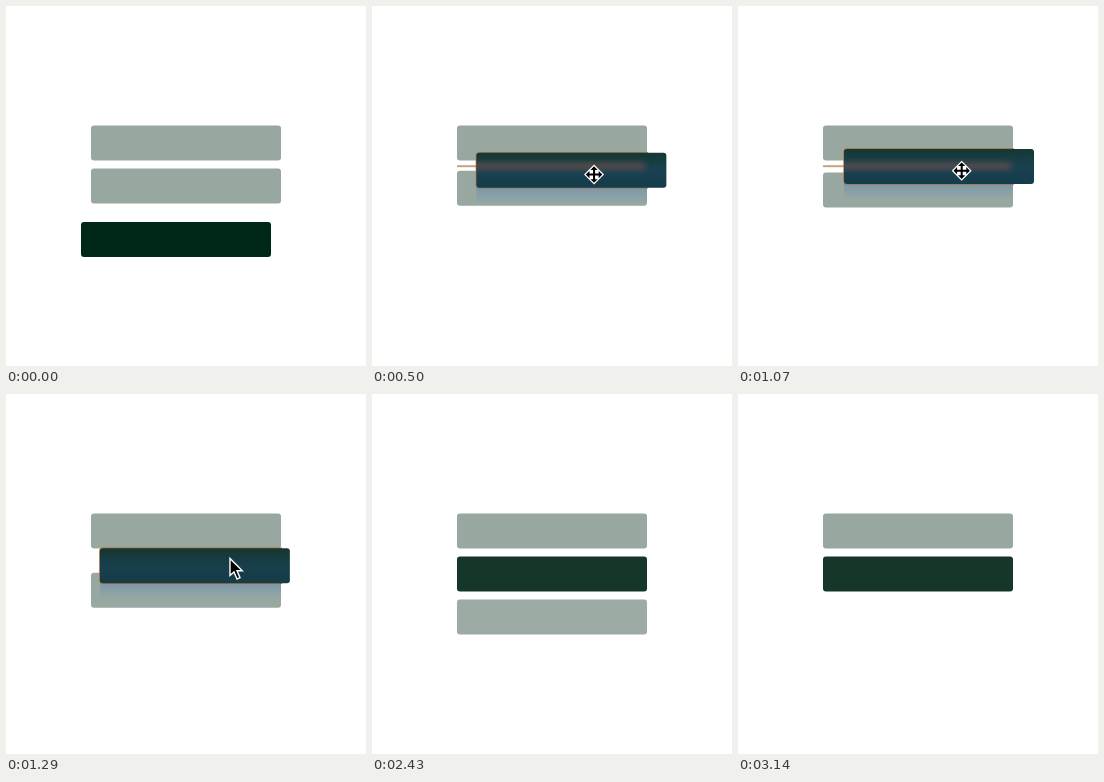
Recreate the animation shown at these times as an HTML page with a canvas. Size 360 by 360 pixels, loop 3430 ms.

```html
<!DOCTYPE html>
<html lang="en">
<head>
<meta charset="utf-8">
<title>Drag to reorder</title>
<style>
  html, body { margin: 0; height: 100%; overflow: hidden; background: #fff; }
  canvas { display: block; width: 100vw; height: 100vh; }
</style>
</head>
<body>
<canvas width="360" height="360"></canvas>
<script>
const ctx = document.querySelector('canvas').getContext('2d');
const LOOP = 3430, STEP = 1000 / 14;
const W = 190, H = 35, LEFT = 85;
const SLOTS = [119.5, 162.5, 205.5];
const LIGHT = '#98a8a1', ORANGE = '#b4703a';

// Times below are in steps of 1/14 s.
const DRAG = 2, HOVER = 6, DROP = 16, SETTLED = 24, FADE = 33.5, GONE = 44;

const progress = (t, from, to) => Math.min(1, Math.max(0, (t - from) / (to - from)));
const easeOut = (p, power = 3) => 1 - (1 - p) ** power;
const mix = (a, b, p) => a + (b - a) * p;
const mixColor = (a, b, p) => `rgb(${a.map((v, i) => Math.round(mix(v, b[i], p)))})`;

function barPath(x, y) {
  ctx.beginPath();
  ctx.roundRect(x, y, W, H, 3);
}

function bar(x, y, fill) {
  barPath(x, y);
  ctx.fillStyle = fill;
  ctx.fill();
}

function polygon(points, fill) {
  ctx.beginPath();
  points.forEach(([x, y]) => ctx.lineTo(x, y));
  ctx.closePath();
  ctx.fillStyle = fill;
  ctx.fill();
}

function moveCursor(x, y) {
  ctx.save();
  ctx.translate(x, y);
  polygon([[0, -10], [10, 0], [0, 10], [-10, 0]], '#fff');
  for (let i = 0; i < 4; i++) {
    polygon([[0, -8.2], [3.6, -4.6], [1, -4.6], [1, 0], [-1, 0], [-1, -4.6], [-3.6, -4.6]], '#000');
    ctx.rotate(Math.PI / 2);
  }
  ctx.restore();
}

function arrowCursor(x, y) {
  ctx.save();
  ctx.translate(x, y);
  polygon([[0, 0], [0, 17], [4, 13.4], [7, 20.5], [10, 19.2], [7, 12.3], [12.3, 12.3]], '#000');
  ctx.strokeStyle = '#fff';
  ctx.lineWidth = 1.4;
  ctx.stroke();
  ctx.restore();
}

// Blue shade cast on the bar below the dragged one.
function shade(x, y, lowerY, alpha) {
  ctx.save();
  barPath(LEFT, lowerY);
  ctx.clip();
  const bottom = y + H;
  const blue = ctx.createLinearGradient(0, bottom, 0, bottom + 16);
  blue.addColorStop(0, `rgba(112, 148, 174, ${0.75 * alpha})`);
  blue.addColorStop(1, 'rgba(112, 148, 174, 0)');
  ctx.fillStyle = blue;
  ctx.fillRect(x, bottom, W, 16);
  ctx.restore();
}

function outline(x, y, alpha) {
  ctx.save();
  ctx.beginPath();
  ctx.rect(0, 0, LEFT + W + 1, 360);
  ctx.clip();
  ctx.globalAlpha = alpha;
  ctx.strokeStyle = ORANGE;
  ctx.lineWidth = 1.3;
  barPath(x, y);
  ctx.stroke();
  ctx.restore();
}

function indicatorGlow(x, y) {
  ctx.save();
  barPath(x, y);
  ctx.clip();
  ctx.filter = 'blur(3px)';
  ctx.fillStyle = 'rgba(125, 84, 74, 0.9)';
  ctx.fillRect(x - 6, 157.5, LEFT + W + 4 - x, 5);
  ctx.restore();
}

function dragFill(y, t) {
  const p = progress(t, DROP, SETTLED);
  const g = ctx.createLinearGradient(0, y, 0, y + H);
  g.addColorStop(0, mixColor([20, 56, 50], [24, 53, 42], p));
  g.addColorStop(0.5, mixColor([26, 65, 82], [18, 56, 58], p));
  g.addColorStop(1, mixColor([20, 60, 74], [18, 56, 58], p));
  return g;
}

function draw(t) {
  const out = easeOut(progress(t, DRAG, 10));
  const back = easeOut(progress(t, DROP, SETTLED));
  const x = mix(mix(75, 106, out), LEFT, back);
  const y = mix(mix(216, 143, out), SLOTS[1], back);
  const gap = 4 * easeOut(progress(t, HOVER, 10));
  const lowerY = mix(SLOTS[1] + gap, SLOTS[2], easeOut(progress(t, DROP, SETTLED), 1.3));
  const dragging = t > DRAG && t < SETTLED;
  const hovering = t >= HOVER && t <= DROP;
  const lift = 1 - progress(t, 18, SETTLED);

  ctx.fillStyle = '#fff';
  ctx.fillRect(0, 0, 360, 360);
  bar(LEFT, SLOTS[0], LIGHT);

  ctx.globalAlpha = 1 - progress(t, FADE, GONE);
  bar(LEFT, lowerY, LIGHT);
  ctx.globalAlpha = 1;

  if (hovering) {
    ctx.fillStyle = '#c6a27e';
    ctx.fillRect(LEFT, 159.2, W, 2);
  }
  if (dragging) {
    if (t >= HOVER) shade(x, y, lowerY, lift);
    outline(x, y, lift);
    bar(x, y, dragFill(y, t));
    if (hovering) indicatorGlow(x, y);
  } else {
    const rest = mixColor([18, 56, 58], [22, 54, 41], progress(t, SETTLED, 27));
    bar(x, y, t <= DRAG ? '#002817' : rest);
  }

  if (t > DRAG && t <= DROP) moveCursor(x + 117.7, y + 21.7);
  else if (t > DROP && t < 22) arrowCursor(224, 164.5);
}

function frame(now) {
  // The picture advances 14 times a second.
  draw(Math.floor((now % LOOP + 5) / STEP));
  requestAnimationFrame(frame);
}
requestAnimationFrame(frame);
</script>
</body>
</html>
```
